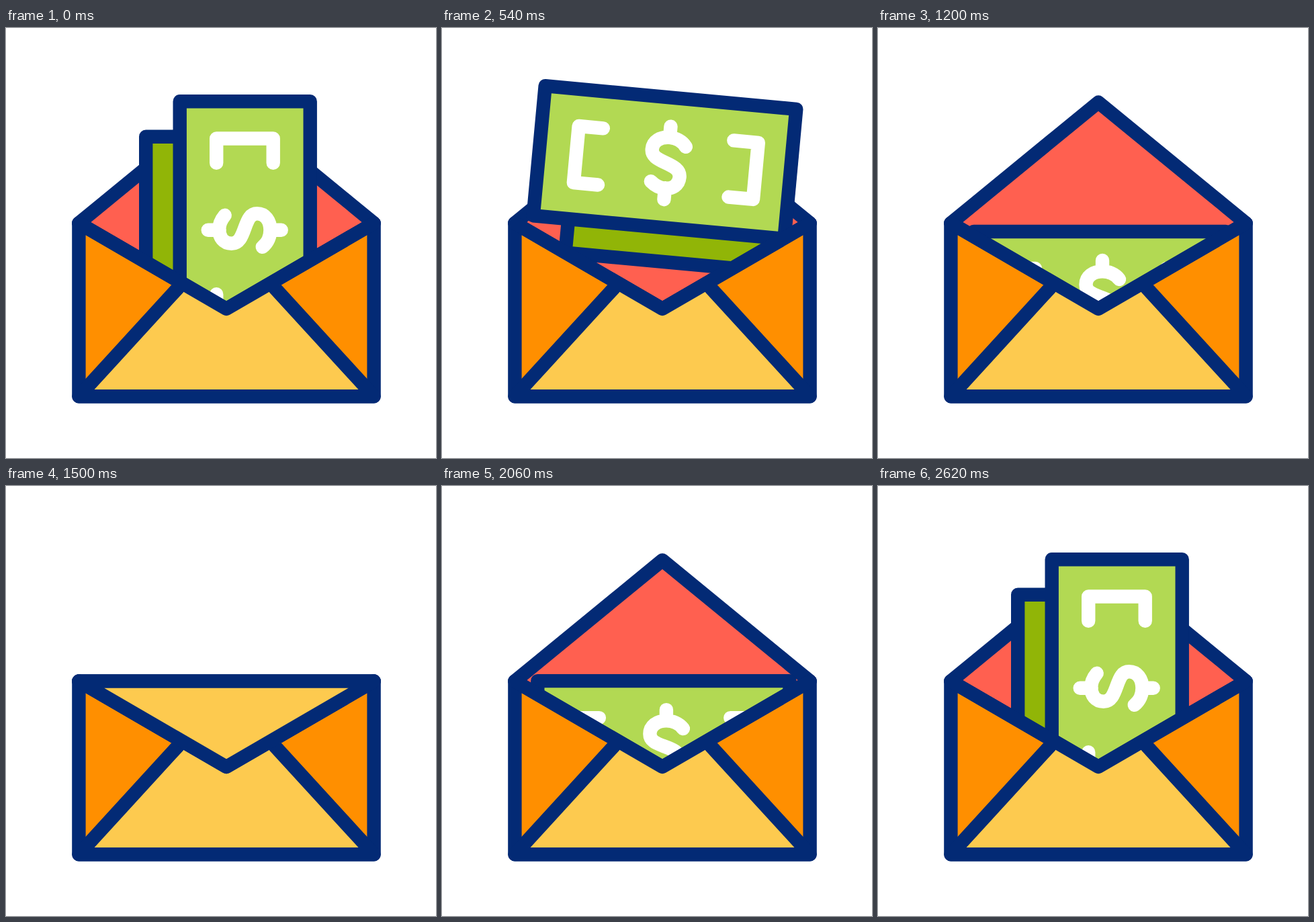
Animation of 640 by 640 pixels, one loop 3.62 s. Source, as an HTML page:

```html
<!DOCTYPE html>
<html lang="en">
<head>
<meta charset="utf-8">
<title>Money in an envelope</title>
<style>
html, body { margin: 0; height: 100%; overflow: hidden; background: #fff; }
svg { display: block; width: 100%; height: 100%; }
.line { stroke: #032a75; stroke-width: 20.4; stroke-linecap: round; stroke-linejoin: round; }
.mark { stroke: #fff; fill: none; }
</style>
</head>
<body>
<svg viewBox="0 0 640 640">
  <g class="line">
    <path id="back" fill="#ff6050"/>
    <g id="bills">
      <rect x="-135" y="-44" width="322" height="191.5" fill="#91b507"/>
      <rect x="-187.6" y="-97" width="375.2" height="194" fill="#b2d953"/>
      <g class="line mark">
        <path d="M-96-42H-132.3V42.5H-96M99.4-42H136V42.5H99.4"/>
        <path d="M4-54V-38M4 38V55M29-26C23-34 13-37.7 4-37.7C-10-37.7-20.5-30-20.5-18
          C-20.5-8-12-4.5 0 0C14 5 24 9 24 20C24 32 15 38.5 3 38.5C-5 38.5-12 35-18 30"/>
      </g>
    </g>
    <path d="M108.4 290.5L328 418L547.6 290.5V548.2H108.4Z" fill="#ff8f00"/>
    <path d="M108.4 548.2L256 387L328 418L400 387L547.6 548.2Z" fill="#fdca4f" stroke="none"/>
    <path d="M108.4 548.2L256 387M400 387L547.6 548.2M108.4 290.5L328 418L547.6 290.5M108.4 548.2H547.6" fill="none"/>
    <path id="flap" fill="#fdca4f"/>
  </g>
</svg>
<script>
const LOOP = 3620, FOLD = 290.5, OPEN = 110.5, SHUT = 418;
const $ = id => document.getElementById(id);

// smooth progress from time a to time b
function ease(t, a, b) {
  const s = Math.min(1, Math.max(0, (t - a) / (b - a)));
  return s * s * (3 - 2 * s);
}

// each leg: start, end, path of the bills' centre, angle before and after
const legs = [
  [200, 600, "M355.7 296.8L330 194", 90, 0],
  [800, 1200, "M330 194V400", 0, 0],
  [2000, 2400, "M330 400C330 366 325.7 211 330 194", 0, 0],
  [2400, 2600, "M330 194C334.3 176.8 351.4 279.7 355.7 296.8", 0, 90]
].map(([start, end, d, from, to]) => {
  const path = document.createElementNS("http://www.w3.org/2000/svg", "path");
  path.setAttribute("d", d);
  return { start, end, path, from, to, length: path.getTotalLength() };
});

function draw(t) {
  const leg = legs.findLast(l => t >= l.start) || legs[0];
  const p = ease(t, leg.start, leg.end);
  const c = leg.path.getPointAtLength(p * leg.length);
  const angle = leg.from + (leg.to - leg.from) * p;
  $("bills").setAttribute("transform", `translate(${c.x} ${c.y}) rotate(${angle})`);

  const tip = OPEN + (SHUT - OPEN) * (ease(t, 1200, 1400) - ease(t, 1800, 2000));
  const down = tip > FOLD;
  $("back").setAttribute("d",
    `M328 418L108.4 ${FOLD}L328 ${Math.min(tip, FOLD)}L547.6 ${FOLD}Z`);
  $("flap").setAttribute("d", down ? `M108.4 ${FOLD}L328 ${tip}L547.6 ${FOLD}Z` : "");
}

const begin = performance.now();
function tick() {
  draw((performance.now() - begin) % LOOP);
  requestAnimationFrame(tick);
}
tick();
</script>
</body>
</html>
```
